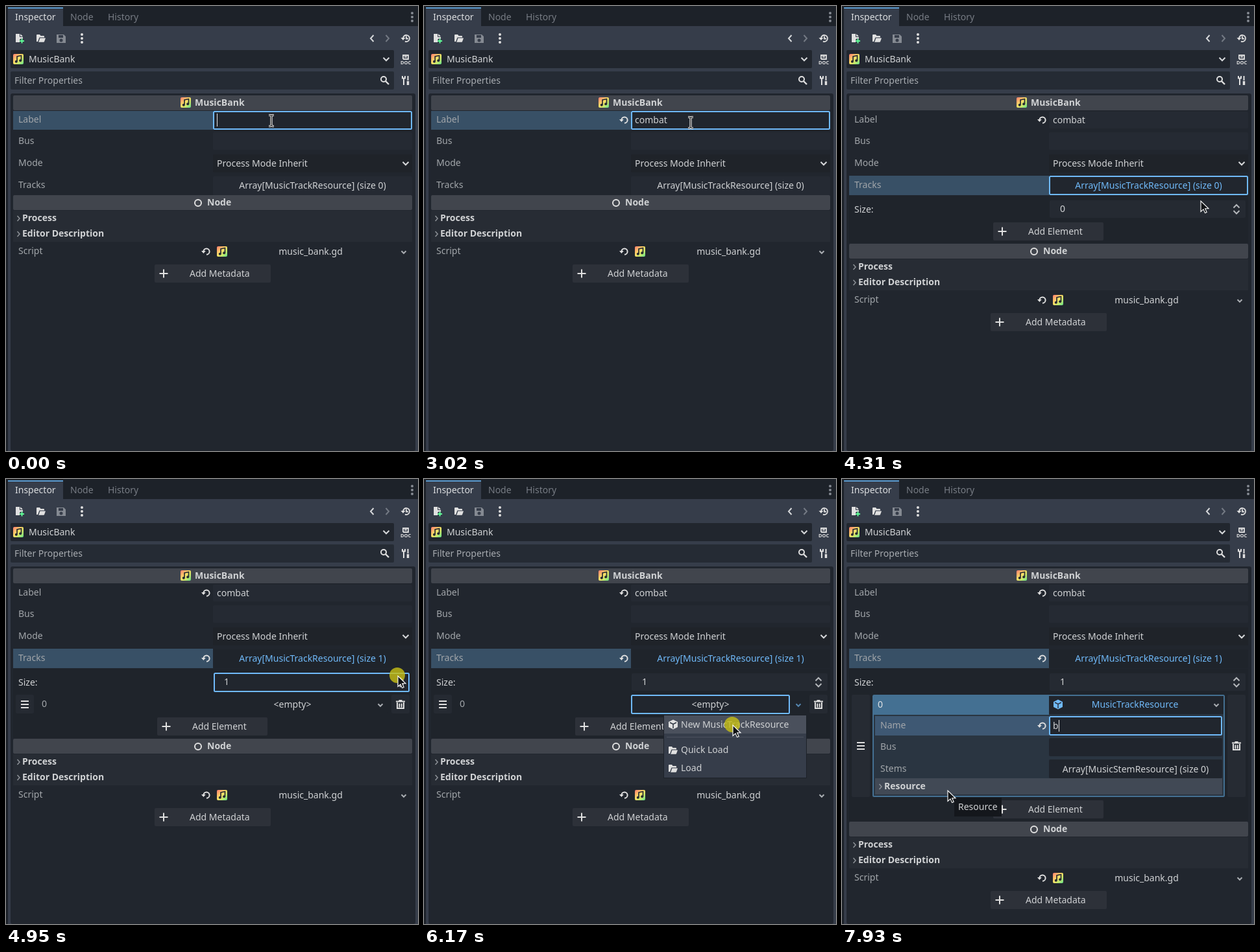
An HTML page that plays this animation: 635 by 687 pixels, repeating every 8 s.

```html
<!DOCTYPE html>
<html lang="en">
<head>
<meta charset="utf-8">
<title>Inspector</title>
<style>
html, body { margin: 0; width: 100%; height: 100%; overflow: hidden; background: #363d4a; }
svg { display: block; }
text { font: 14px "Noto Sans", sans-serif; white-space: pre; }
.b { font-weight: 700; }
</style>
</head>
<body>
<svg width="635" height="687" viewBox="0 0 635 687">
  <defs>
    <linearGradient id="rainbow" x1="0" y1="0" x2="1" y2="1">
      <stop offset="0" stop-color="#ff7a70"/><stop offset=".45" stop-color="#ffde66"/>
      <stop offset=".7" stop-color="#c5e86b"/><stop offset="1" stop-color="#5fe08c"/>
    </linearGradient>
    <g id="music">
      <rect width="16" height="16" rx="2" fill="url(#rainbow)"/>
      <path d="M6 11.5V4l6.5-1.5V10" fill="none" stroke="#272b33" stroke-width="1.7"/>
      <circle cx="4.8" cy="11.8" r="2" fill="#272b33"/><circle cx="11.2" cy="10.3" r="2" fill="#272b33"/>
    </g>
    <g id="reset" fill="none" stroke="#e0e0e0" stroke-width="2">
      <path d="M-3.6 0A4.6 4.6 0 1 1 1 4.7"/><path d="M-7 -1h6.8l-3.4 4z" fill="#e0e0e0" stroke="none"/>
    </g>
    <path id="plus" d="M-6.5 0h13M0 -6.5v13" stroke="#e0e0e0" stroke-width="2"/>
    <path id="folder" d="M1 13V3q0-1 1-1h4l1.5 2H12q1 0 1 1v1.500H5.500L3 13zM4.500 13L6.500 7.500H15L13 13q-.3.800-1 .800H4z" fill="#e0e0e0"/>
    <g id="trash" fill="none" stroke="#e0e0e0" stroke-width="2">
      <path d="M-7 -4.500H7M-2.500 -6H2.500M-5 -3V6H5V-3M-1.700 -1.500V4.500M1.700 -1.500V4.500"/>
    </g>
    <path id="bars" d="M-6 -5H6M-6 0H6M-6 5H6" stroke="#e0e0e0" stroke-width="2"/>
    <g id="cube">
      <path d="M0 -7.500L7 -4V4L0 7.500L-7 4V-4z" fill="currentColor"/>
      <path d="M-5 -3L0 -.500L5 -3M0 -.500V6" fill="none" stroke="#2c333f" stroke-width="1.500"/>
    </g>
    <path id="arrow" d="M0 0V16.500L4 12.800L6.600 18.600L9.200 17.400L6.700 11.800H12z" fill="#101214" stroke="#fff" stroke-width="1.100"/>
    <g id="ibeam" fill="none">
      <path id="beam" d="M-4 -8.500H-1.500L0 -7.500L1.500 -8.500H4M0 -7.500V7.500M-4 8.500H-1.500L0 7.500L1.500 8.500H4" stroke="#fff" stroke-width="3.200"/>
      <path d="M-4 -8.500H-1.500L0 -7.500L1.500 -8.500H4M0 -7.500V7.500M-4 8.500H-1.500L0 7.500L1.500 8.500H4" stroke="#111" stroke-width="1.200"/>
    </g>
  </defs>
  <g id="frame"></g>
  <g id="panel"></g>
  <circle id="click" r="12" fill="#c4bd16" fill-opacity=".82"/>
  <use id="pointer"/>
</svg>
<script>
const LOOP = 8000;
const ACCENT = '#70bafa', LIGHT = '#d0d2d4', LABEL = '#a2a6aa', DIM = '#777c84';
const BODY = '#21262e', FIELD = '#252a33', DARK = '#1d2229', BUTTON = '#2d3139', HEAD = '#41454d', SELECT = '#385066';
const $ = id => document.getElementById(id);

const box = (x, y, w, h, fill, rx = 0) =>
  `<rect x="${x}" y="${y}" width="${w}" height="${h}" rx="${rx}" fill="${fill}"/>`;
const outline = (x, y, w, h, stroke = ACCENT, fill = BODY) =>
  `<rect x="${x + 1}" y="${y + 1}" width="${w - 2}" height="${h - 2}" rx="1.5" fill="${fill}" stroke="${stroke}" stroke-width="2"/>`;
const field = (focused, x, y, w, h, fill = FIELD) =>
  focused ? outline(x, y, w, h) : box(x, y + 1, w, h - 3, fill, 2);
const text = (x, y, s, fill = LIGHT, attrs = '') => `<text x="${x}" y="${y}" fill="${fill}" ${attrs}>${s}</text>`;
const bold = (x, y, s) => text(x, y, s, LIGHT, 'class="b"');
const mid = (x, y, s, fill) => text(x, y, s, fill, 'text-anchor="middle"');
const icon = (id, x, y, color = ACCENT) => `<use href="#${id}" x="${x}" y="${y}" color="${color}"/>`;
const line = (d, stroke = '#d6d8da', w = 2) => `<path d="${d}" fill="none" stroke="${stroke}" stroke-width="${w}"/>`;
const down = (x, y, r = 4.5, color) => line(`M${x - r} ${y - r / 2}l${r} ${r}l${r} ${-r}`, color);
const right = (x, y) => line(`M${x - 1.5} ${y - 4}l3.500 4l-3.500 4`, '#8e9298', 1.5);
const caret = (x, y, h) => box(x, y, 1, h, '#e0e0e0');
const dots = (x, y, fill) => [-6, 0, 6].map(d => `<circle cx="${x}" cy="${y + d}" r="2" fill="${fill}"/>`).join('');

$('frame').innerHTML = [
  box(0, 0, 635, 687, '#363d4a'), box(0, 0, 635, 31, DARK), box(0, 0, 3, 687, DARK),
  box(3, 3, 85, 29, '#363d4a'), box(3, 2, 85, 2, '#5b9bd0'),
  text(14, 22, 'Inspector', '#dcdee0'), text(99, 22, 'Node', DIM), text(157, 22, 'History', DIM),
  dots(626, 17, '#858a92'), dots(117, 50, '#e0e0e0'),
  // toolbar
  '<path d="M15 43h6v5h5v8H15zM22 43l4 4h-4z" fill="#e0e0e0"/>',
  '<path d="M24.500 50.500v7M21 54h7" stroke="#363d4a" stroke-width="5"/>',
  line('M24.500 50.500v7M21 54h7', '#5fff97'), icon('folder', 46, 42),
  '<path d="M78 44h11l3 3v10H78zM81 45v4h7v-4zM82.500 53a2.500 2.500 0 1 0 5 0a2.500 2.500 0 1 0-5 0" fill="#858a92" fill-rule="evenodd"/>',
  line('M566.500 45l-4.500 5l4.500 5'), line('M585.500 45l4.500 5l-4.500 5', '#747a84'),
  line('M612 50a5 5 0 1 1 3 4.600M617 46.500V50.500H620', '#e0e0e0', 1.8), '<path d="M608.500 49h7l-3.500 4z" fill="#e0e0e0"/>',
  // object and filter bars
  box(7, 68, 591, 28, BODY, 2), icon('music', 11, 74), text(35, 87, 'MusicBank'), down(586, 82),
  box(7, 101, 591, 28, '#252b34', 2), text(13, 120, 'Filter Properties', '#a7abb0'),
  '<circle cx="582" cy="113" r="4" fill="none" stroke="#e0e0e0" stroke-width="2"/>', line('M585 116l5 5', '#e0e0e0', 2.4),
  line('M612 82V76h8v6h-8M614 78.500h4', '#e0e0e0', 1.8),
  text(608, 90, 'DOC', '#e0e0e0', 'class="b" style="font-size:7.5px"'),
  line('M613 116v6M619.500 108v7M611 108v3.500h4V108M613 112v5', '#e0e0e0', 2),
  line('M619.500 116v6', '#e0e0e0', 3.4),
  box(7, 135, 624, 552, BODY, 3),
  box(11, 138, 615, 23, HEAD, 2), icon('music', 269, 141), bold(291, 154, 'MusicBank')
].join('');

// time, x, y of the pointer
const PATH = [
  [0, 409, 177], [2960, 409, 177], [3120, 414, 186], [3260, 426, 206], [3440, 451, 249], [3600, 464, 269],
  [4050, 464, 269], [4180, 504, 284], [4310, 553, 301], [4500, 590, 305], [4850, 604, 304],
  [5020, 604, 304], [5200, 560, 322], [5360, 509, 339], [5480, 490, 344],
  [5740, 490, 344], [5900, 484, 358], [6100, 476, 380],
  [6390, 476, 380], [6600, 455, 382], [6800, 440, 381],
  [7080, 440, 381], [7180, 350, 420], [7300, 215, 472], [7420, 163, 481]
];
const CLICKS = [[3660, 3760], [4880, 5000], [5500, 5670], [6130, 6270], [6820, 6930]];
const TYPING = [[950, 'c'], [1090, 'co'], [1430, 'com'], [1740, 'comb'], [1910, 'comba'], [2210, 'combat']];
const CARET_X = { '': 325, c: 332, co: 340, com: 353, comb: 362, comba: 370, combat: 375 };
const within = (t, spans) => spans.some(([a, b]) => t >= a && t < b);

function pointerAt(t) {
  const i = PATH.findIndex(p => p[0] > t);
  if (i < 0) return PATH[PATH.length - 1].slice(1);
  const [t0, x0, y0] = PATH[i - 1], [t1, x1, y1] = PATH[i];
  const k = (t - t0) / (t1 - t0);
  return [x0 + (x1 - x0) * k, y0 + (y1 - y0) * k];
}

function properties(t, y) {
  const typing = t < 3660, typed = (TYPING.filter(s => s[0] <= t).pop() || [0, ''])[1];
  const blink = within(t, [[0, 240], [750, 2710], [3220, 3660]]);
  const toggled = t >= 3740, sized = t >= 4920, tracksFocus = t >= 3660 && t < 4880;
  const over = (a, b) => t < 3660 && y >= a && y < b;
  return [
    typing ? box(11, 162, 308, 29, SELECT) : '', text(19, 180, 'Label', LABEL),
    field(typing, 319, 162, 307, 29), text(325, 181, typed), typed && icon('reset', 308, 176),
    typing && blink ? caret(CARET_X[typed], 166, 20) : '',
    text(19, 213, 'Bus', LABEL), box(319, 195, 307, 27, FIELD, 2),
    text(19, 247, 'Mode', LABEL), box(319, 229, 307, 28, over(229, 257) ? '#31353d' : '#1f2329', 2),
    text(325, 248, 'Process Mode Inherit'), down(616, 243),
    typing ? '' : box(11, 262, 308, 30, SELECT), text(19, 281, 'Tracks', LABEL),
    sized ? icon('reset', 308, 277) : '',
    tracksFocus ? outline(319, 262, 307, 30) : box(319, 263, 307, 29, over(262, 292) ? '#32363e' : toggled ? '#1f242b' : FIELD, 2),
    mid(472.5, 282, `Array[MusicTrackResource] (size ${sized ? 1 : 0})`, toggled ? ACCENT : LIGHT)
  ].join('');
}

function resource(t) {
  const editing = t >= 6860, typed = t >= 7890, hover = t >= 7300;
  const on = within(t, [[6860, 7380], [7890, LOOP]]);
  return [
    box(15, 333, 28, 158, '#262b33', 2), box(594, 333, 28, 158, '#262b33', 2), icon('bars', 29, 412), icon('trash', 608, 412),
    outline(47, 333, 543, 158, '#447092', '#2a3541'), box(48, 334, 271, 30, '#447092'), text(55, 353, '0', '#e0e2e4'),
    box(319, 335, 269, 28, '#20252d'), editing ? '' : outline(319, 333, 245, 30),
    icon('cube', 333, 348), mid(451.5, 353, 'MusicTrackResource', ACCENT), down(577, 349, 3.5, '#a9adb2'),
    editing ? box(51, 366, 268, 30, '#3e5873') : '', text(59, 385, 'Name', LABEL),
    field(editing, 319, 366, 267, 30, '#20252d'),
    typed ? text(325, 386, 'b') + icon('reset', 308, 381) : '', editing && on ? caret(typed ? 334 : 325, 372, 18) : '',
    text(59, 418, 'Bus', LABEL), box(319, 400, 267, 28, '#20252d', 2),
    text(59, 452, 'Stems', LABEL), box(319, 433, 267, 29, '#20252d', 2), mid(452.5, 453, 'Array[MusicStemResource] (size 0)'),
    box(51, 462, 535, 25, hover ? '#414955' : '#38414e'), right(59, 475), bold(65, 479, 'Resource')
  ].join('');
}

function element(t) {
  const picked = t >= 5640;
  return [
    box(15, 333, 28, 29, '#252a32', 2), icon('bars', 29, 348), text(55, 352, '0', LABEL),
    picked ? outline(319, 333, 245, 30) : box(319, 334, 270, 28, '#1f242b', 2), mid(441.5, 353, '&lt;empty&gt;'),
    down(577, 349, 3.5, picked ? '#5587b0' : '#a9adb2'), box(594, 333, 28, 29, '#252a32', 2), icon('trash', 608, 348)
  ].join('');
}

function array(t, shift) {
  const sized = t >= 4920, focus = t >= 4880 && t < 5640, y = shift - 75;
  return [
    box(11, 293, 615, shift - 2, '#1f242b'), text(19, 319, 'Size:'),
    focus ? outline(320, 299, 302, 30) : box(320, 300, 302, 27, '#252a32', 2), text(336, 318, sized ? '1' : '0'),
    line('M603.500 311.500l4.500-4.500l4.500 4.500M603.500 316l4.500 4.500l4.500-4.500', '#b4b7bb'),
    t >= 6270 ? resource(t) : sized ? element(t) : '',
    box(233, 334 + y, 170, 28, BUTTON, 2), icon('plus', 247, 348 + y), text(287, 353 + y, 'Add Element')
  ].join('');
}

const nodeSection = shift => `<g transform="translate(0 ${shift})">` + [
  box(11, 292, 615, 23, HEAD, 2), '<circle cx="296" cy="304" r="5" fill="none" stroke="#e0e0e0" stroke-width="2"/>', bold(310, 308, 'Node'),
  box(11, 316, 615, 48, '#272c34'), right(19, 328), bold(25, 332, 'Process'), right(19, 352), bold(25, 356, 'Editor Description'),
  text(19, 383, 'Script', LABEL), icon('reset', 308, 379), icon('music', 325, 371), mid(469.5, 384, 'music_bank.gd'), down(613, 380, 3.5, '#a9adb2'),
  box(229, 399, 179, 28, BUTTON, 2), icon('plus', 243, 413), text(283, 418, 'Add Metadata')
].join('') + '</g>';

const popup = hover => [
  box(369, 364, 221, 98, DARK), box(370, 365, 219, 96, '#363d4a'),
  hover ? box(370, 365, 219, 28, '#4a505c') : '', icon('cube', 384, 379, '#e0e0e0'), text(396, 384, 'New MusicTrackResource'),
  box(374, 398, 211, 1, '#4c525e'),
  icon('folder', 376, 411), text(396, 423, 'Quick Load'), icon('folder', 376, 439), text(396, 451, 'Load')
].join('');

const tooltip = box(173, 492, 73, 29, '#14171c') + text(179, 511, 'Resource');

let shown = '';
function draw(t) {
  const [x, y] = pointerAt(t);
  const shift = t < 3800 ? 0 : t < 4920 ? 75 : t < 6270 ? 109 : 237;
  const markup = properties(t, y) + (shift ? array(t, shift) : '') + nodeSection(shift) +
    (t >= 5740 && t < 6270 ? popup(y > 365) : '') + (t >= 7930 ? tooltip : '');
  if (markup !== shown) $('panel').innerHTML = shown = markup;

  const overText = x > 319 && (t < 3800 && ((y > 162 && y < 191) || (y > 195 && y < 222)) ||
    t >= 6410 && ((y > 366 && y < 396) || (y > 400 && y < 428)));
  $('pointer').setAttribute('href', overText ? '#ibeam' : '#arrow');
  $('pointer').setAttribute('transform', `translate(${Math.round(x)} ${Math.round(y)})`);
  $('click').setAttribute('transform', `translate(${Math.round(x) - 1} ${Math.round(y) - 1})`);
  $('click').setAttribute('visibility', within(t, CLICKS) ? 'visible' : 'hidden');
}

const start = performance.now();
function tick() {
  draw((performance.now() - start) % LOOP);
  requestAnimationFrame(tick);
}
tick();
</script>
</body>
</html>
```
